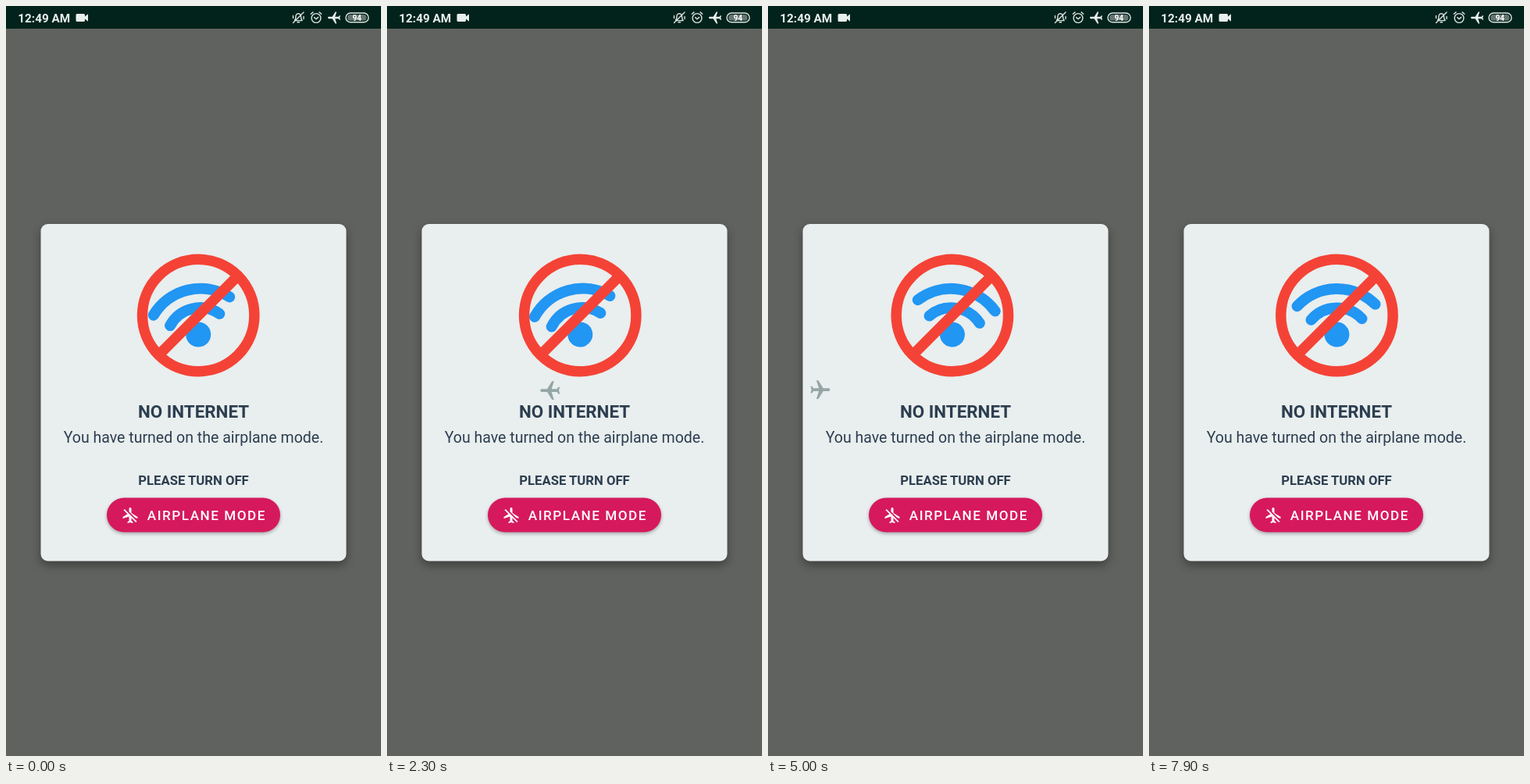
Animation of 480x960 px, one loop 8000 ms. Source, as an HTML page:

```html
<!DOCTYPE html>
<html lang="en">
<head>
<meta charset="utf-8">
<title>No internet dialog</title>
<style>
  html, body { margin: 0; width: 100%; height: 100%; overflow: hidden; background: #60625f; }
  svg { display: block; width: 100vw; height: 100vh; }
  text { font-family: Roboto, "Open Sans", sans-serif; }
  .dialog { fill: #2c3e50; text-anchor: middle; }
  .bold { font-weight: 700; }
  .card { filter: drop-shadow(0 5px 6px rgba(0, 0, 0, .36)); }
  .button { filter: drop-shadow(0 2px 2px rgba(0, 0, 0, .3)); }
  .line { fill: none; stroke: #dce5e2; stroke-width: 1.4; stroke-linecap: round; stroke-linejoin: round; }
  .waves { fill: none; stroke: #2196f3; stroke-width: 14; stroke-linecap: round; }
  .ban { fill: none; stroke: #f44336; stroke-width: 13.5; }
</style>
</head>
<body>
<svg viewBox="0 0 480 960" xmlns="http://www.w3.org/2000/svg">
  <defs>
    <path id="jet" transform="translate(-11.5 -12)" d="M21 16v-2l-8-5V3.5c0-.83-.67-1.5-1.5-1.5S10 2.67 10 3.5V9l-8 5v2l8-2.5V19l-2 1.5V22l3.5-1 3.5 1v-1.5L13 19v-5.5l8 2.5z"/>
    <clipPath id="inside"><rect x="44.5" y="279" width="391" height="431.5" rx="9"/></clipPath>
  </defs>

  <rect width="480" height="960" fill="#60625f"/>

  <!-- status bar -->
  <rect width="480" height="29" fill="#02231b"/>
  <g fill="#e8efec">
    <text class="bold" x="15.3" y="20.6" font-size="15.3">12:49 AM</text>
    <path d="M91 10h8.5q1.5 0 1.5 1.5v2l4-3.3v9.6l-4-3.3v2q0 1.5-1.5 1.5H91q-1.5 0-1.5-1.5v-7q0-1.5 1.5-1.5z"/>
    <use href="#jet" transform="translate(420 15) rotate(-90) scale(.8)"/>
  </g>
  <g class="line">
    <path d="M369.5 18.6q1.4-1.5 1.4-5 0-3.4 3.3-4 3.3.6 3.3 4 0 3.500 1.600 5zM373 20.800h2.500M381 8l-13.500 13.500M367.500 12.500v3M381 13.500v3"/>
    <circle cx="397" cy="15.500" r="5.900"/>
    <path d="M394.600 14.600l2.400 2.100 2.700-2.300M390.300 10.200l2.700-2.300M403.700 10.200l-2.700-2.300"/>
    <rect x="435" y="9" width="29" height="11.800" rx="5.900"/>
  </g>
  <rect x="437" y="11" width="24.500" height="7.800" rx="3.900" fill="#64756f"/>
  <text class="bold" x="449.300" y="18.500" font-size="10" text-anchor="middle" fill="#fff">94</text>

  <!-- dialog -->
  <rect class="card" x="44.500" y="279" width="391" height="431.500" rx="9" fill="#e9eeee"/>
  <g id="sign">
    <g id="wifi">
      <path class="waves" d="M-50 -37.500A70 70 0 0 1 50 -37.500M-32.500 -19.500A43.700 43.700 0 0 1 32.500 -19.500"/>
      <circle r="16" fill="#2196f3"/>
    </g>
    <g class="ban">
      <circle cy="-24.500" r="71.700"/>
      <path d="M-49 24.500L49 -73.500"/>
    </g>
  </g>
  <g clip-path="url(#inside)">
    <use id="plane" href="#jet" fill="#95a5a6"/>
  </g>
  <g class="dialog">
    <text class="bold" x="240" y="527.300" font-size="22.400">NO INTERNET</text>
    <text x="240" y="559" font-size="19.550">You have turned on the airplane mode.</text>
    <text class="bold" x="240" y="612.500" font-size="16.700">PLEASE TURN OFF</text>
  </g>

  <rect class="button" x="129" y="629.500" width="222" height="44" rx="22" fill="#d6195c"/>
  <path fill="#fff" transform="translate(147.500 640)" d="M13 9V3.500c0-.83-.67-1.500-1.500-1.500S10 2.670 10 3.500v3.680l7.830 7.830L21 16v-2l-8-5zM3 5.270l4.990 4.990L2 14v2l8-2.500V19l-2 1.500V22l3.500-1 3.500 1v-1.500L13 19v-3.730L18.730 21 20 19.730 4.270 4z"/>
  <text x="180.800" y="658.100" font-size="17.100" font-weight="500" letter-spacing="1.530" fill="#fff">AIRPLANE MODE</text>
</svg>
<script>
  const LOOP = 8000, STEP = 100, PI = Math.PI;
  const byId = id => document.getElementById(id);
  const sign = byId("sign"), wifi = byId("wifi"), plane = byId("plane");
  const move = (node, value) => node.setAttribute("transform", value);

  function draw(ms) {
    const t = ms / 1000;

    // The swing to the left is quicker than the one to the right.
    const beat = 0.975 * t - 0.23;
    const lead = 0.075 * (1 + Math.sin(PI * beat));
    const sway = 6.5 * Math.cos(PI * (beat + lead));
    move(sign, `translate(${241 + sway} 420.5)`);
    move(wifi, `rotate(${-2.1 * sway - 2.5})`);

    // One crossing each way, turning round outside the card.
    const angle = PI * (t - 0.125) / 4;
    const x = 239.3 + 223 * Math.cos(angle);
    const heading = Math.sin(angle) > 0 ? -90 : 90;
    move(plane, `translate(${x} ${heading < 0 ? 492 : 491}) rotate(${heading}) scale(1.25)`);
  }

  function tick() {
    const now = performance.now() + 16;
    draw(Math.floor(now % LOOP / STEP) * STEP);
    requestAnimationFrame(tick);
  }
  draw(0);
  requestAnimationFrame(tick);
</script>
</body>
</html>
```
